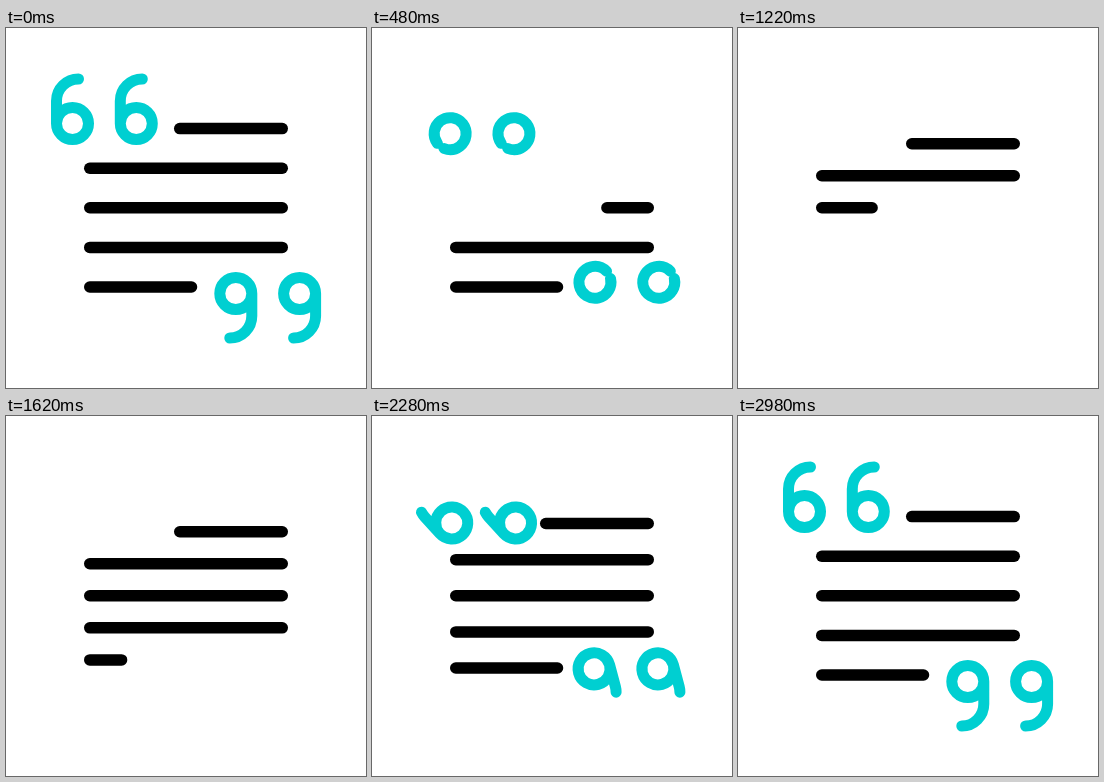
Recreate the animation shown at these times as an HTML page with a canvas. Size 360 px wide and 360 px high, loop 3 s.

```html
<!DOCTYPE html>
<html lang="en">
<head>
<meta charset="utf-8">
<title>Quote</title>
<style>
html, body { margin: 0; width: 100%; height: 100%; overflow: hidden; background: #fff; }
canvas { display: block; }
</style>
</head>
<body>
<canvas id="stage" width="360" height="360"></canvas>
<script>
const ctx = document.getElementById('stage').getContext('2d');
const LOOP = 3000;
const LEFT = 83.75, MIDDLE = 173.75, RIGHT = 276.25;
const LINES = [[MIDDLE, RIGHT], [LEFT, RIGHT], [LEFT, RIGHT], [LEFT, RIGHT], [LEFT, 185.5]];
const RADIUS = 16, STEM = 22.5, HOOK = 22;
const MARK_LENGTH = 2 * Math.PI * RADIUS + STEM + HOOK * Math.PI / 2;

const progress = (t, from, to) => Math.min(1, Math.max(0, (t - from) / (to - from)));
const ease = p => (1 - Math.cos(Math.PI * p)) / 2;

function drawLines(t) {
  const erasing = t < 780;
  const spread = erasing ? 1 : ease(progress(t, 1840, 2680));
  const gap = 32.05 + 7.55 * spread;
  ctx.strokeStyle = '#000';
  ctx.lineWidth = 11.5;
  LINES.forEach(([x1, x2], i) => {
    const start = erasing ? 105 + 135 * i : 780 + 195 * i;
    const p = progress(t, start, start + (erasing ? 135 : 195));
    if (p === (erasing ? 1 : 0)) return;
    const x = x1 + (x2 - x1) * p;
    const y = 179.8 + (i - 2) * gap;
    ctx.beginPath();
    ctx.moveTo(erasing ? x : x1, y);
    ctx.lineTo(erasing ? x2 : x, y);
    ctx.stroke();
  });
}

// Ring first, then stem and hook, so that a dash reveals the mark from its ring.
function drawMark(x, y, angle, shown) {
  ctx.save();
  ctx.translate(x, y);
  ctx.rotate(angle * Math.PI / 180);
  ctx.setLineDash([shown * MARK_LENGTH, 999]);
  ctx.beginPath();
  ctx.arc(0, 0, RADIUS, Math.PI, 3 * Math.PI);
  ctx.lineTo(-RADIUS, -STEM);
  ctx.arc(HOOK - RADIUS, -STEM, HOOK, Math.PI, 1.5 * Math.PI);
  ctx.stroke();
  ctx.restore();
}

function drawMarks(t) {
  const leaving = t < 1200;
  const shown = leaving ? 1 - progress(t, 250, 800) : progress(t, 1630, 2430);
  if (!shown) return;
  const fold = leaving ? ease(progress(t, 0, 1080)) : 1 - ease(progress(t, 1500, LOOP));
  ctx.strokeStyle = '#00cfd1';
  ctx.lineWidth = 11;
  for (const shift of [0, 63.8]) {
    drawMark(66.5 + shift + fold * (26 + 5 * fold), 95.5 + 24.5 * fold, -90 * fold, shown);
    drawMark(229.8 + shift - 16.5 * fold, 265.5 - 27 * fold, 180 - 32 * fold, shown);
  }
}

function frame(now) {
  const t = (now - begin) % LOOP;
  ctx.clearRect(0, 0, 360, 360);
  ctx.lineCap = 'round';
  drawLines(t);
  drawMarks(t);
  requestAnimationFrame(() => frame(performance.now()));
}

const begin = performance.now();
frame(begin);
</script>
</body>
</html>
```
